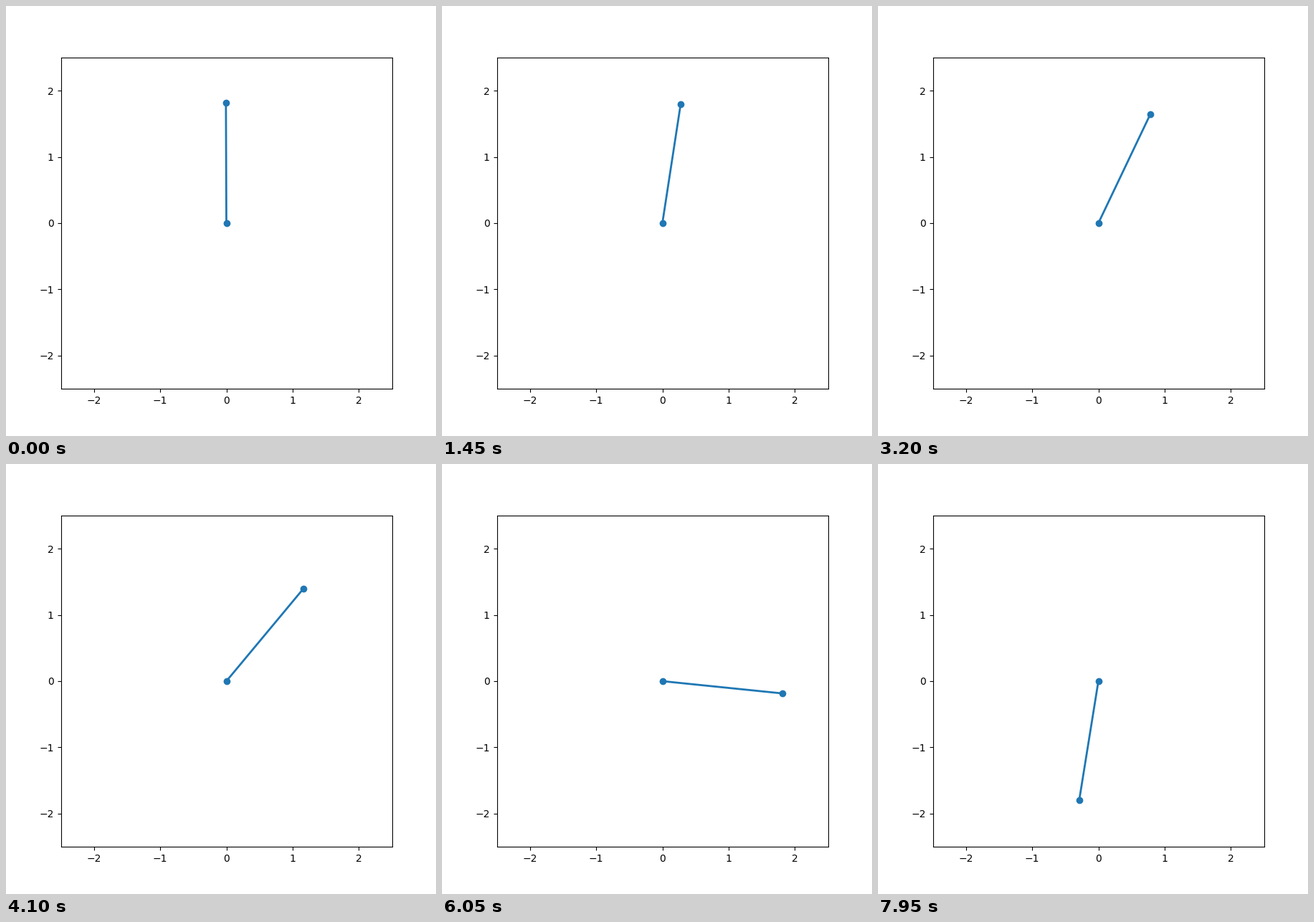
Write a matplotlib script that moves like this. It is 600 by 600 pixels and loops after 8 s.

```python
import numpy as np
import matplotlib.pyplot as plt
from matplotlib.animation import FuncAnimation

FRAMES = 160
INTERVAL = 50          # ms
DT = 0.01              # simulated seconds per frame
LENGTH = 1.82
K = 5.42               # gravity over length
START = np.array([-0.0038, 0.5028])   # angle from upright, angular speed


def rate(s):
    return np.array([s[1], K * np.sin(s[0])])


def rk4(s, h):
    a = rate(s)
    b = rate(s + h / 2 * a)
    c = rate(s + h / 2 * b)
    d = rate(s + h * c)
    return s + h / 6 * (a + 2 * b + 2 * c + d)


def solve():
    states = [START]
    for _ in range(FRAMES - 1):
        states.append(rk4(states[-1], DT))
    return np.array(states)[:, 0]


angles = solve()

fig = plt.figure(figsize=(6, 6), dpi=100)
ax = fig.add_subplot(autoscale_on=False, xlim=(-2.5, 2.5), ylim=(-2.5, 2.5))
ax.set_aspect("equal")
rod, = ax.plot([], [], "o-", lw=2)


def draw(i):
    a = angles[i]
    rod.set_data([0, LENGTH * np.sin(a)], [0, LENGTH * np.cos(a)])
    return rod,


anim = FuncAnimation(fig, draw, frames=FRAMES, interval=INTERVAL,
                     repeat=True, repeat_delay=0, blit=False)
plt.show()
```
